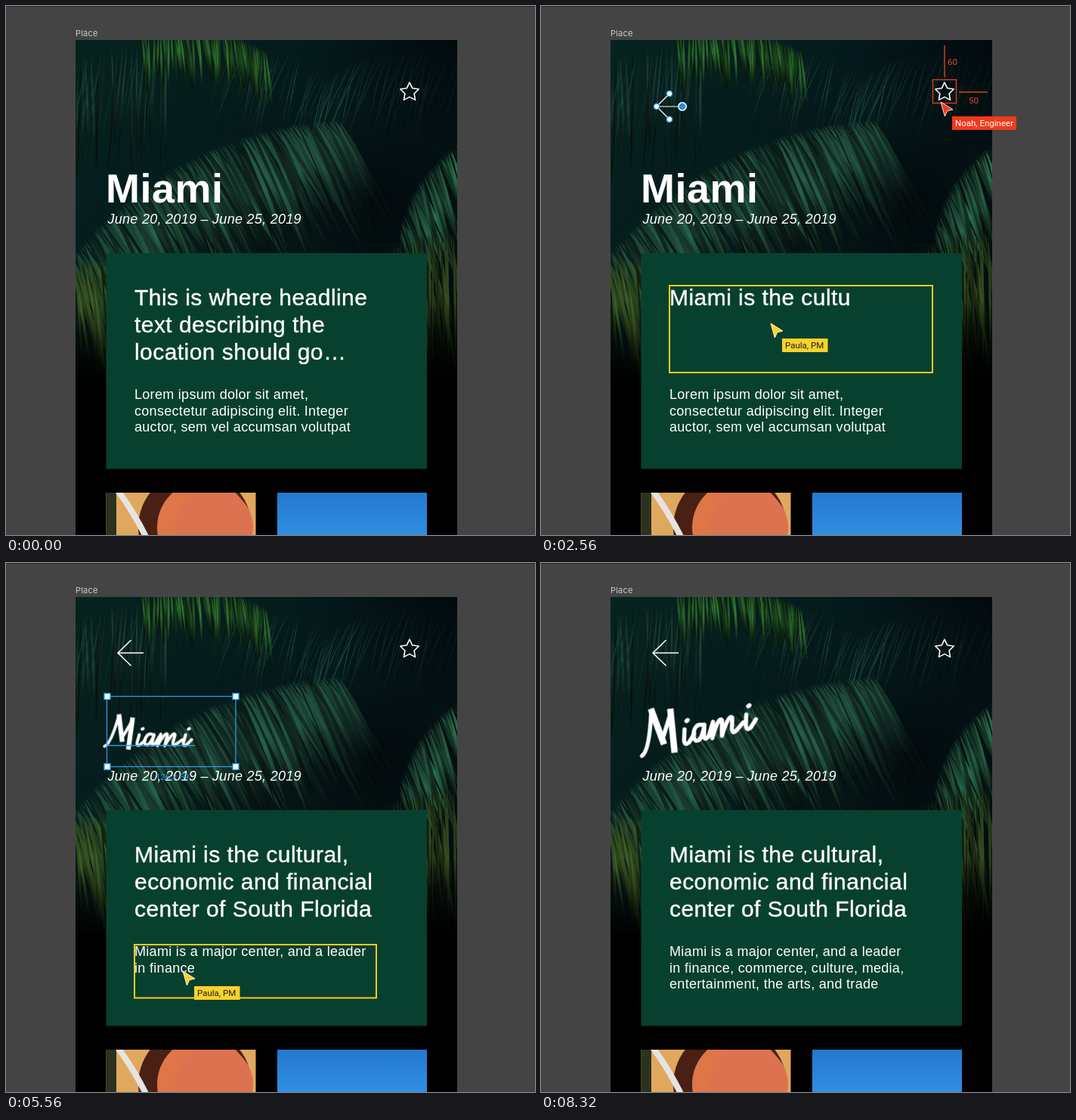
An HTML page with a canvas for the animation above (8560 ms loop, 700x700 px).

```html
<!DOCTYPE html>
<html lang="en">
<head>
<meta charset="utf-8">
<title>Place</title>
<style>
html, body { margin: 0; width: 100%; height: 100%; overflow: hidden; background: #444; }
canvas, svg { position: absolute; left: 0; top: 0; width: 700px; height: 700px; }
text { white-space: pre; fill: #fff; font-family: "Liberation Sans", Arial, sans-serif; }
.head { font-size: 30px; letter-spacing: .45px; stroke: #fff; stroke-width: .4px; }
.para { font-size: 18px; letter-spacing: .3px; }
.title { font-size: 54px; font-weight: 700; letter-spacing: .5px; }
.date { font-size: 18px; font-style: italic; letter-spacing: .28px; }
.board { font: 11px Inter, sans-serif; letter-spacing: .2px; fill: #ccc; }
.tag { font: 11.5px Roboto, sans-serif; }
.white, .blue, .red, .yellow, .brush { fill: none; }
.white { stroke: #fff; stroke-width: 1.6; stroke-linejoin: round; }
.thin { stroke-width: 1.2; }
.blue { stroke: #2f9be6; stroke-width: 1.3; }
.knob { fill: #fff; stroke: #2f9be6; stroke-width: 1.4; }
.picked { fill: #2090e0; stroke: #fff; stroke-width: 1.6; }
.red { stroke: #d8401f; stroke-width: 1.4; }
.yellow { stroke: #f5c922; stroke-width: 2; }
.brush { stroke: #fff; stroke-width: 5.4; stroke-linecap: round; stroke-linejoin: round; }
.wide { stroke-width: 8.5; stroke-linecap: butt; }
#spin { transform-origin: 212px 222px; }
#grow { transform-origin: 137px 260px; }
</style>
</head>
<body>
<canvas id="art" width="700" height="700"></canvas>
<svg viewBox="0 0 700 700">
  <defs>
    <path id="arrow" d="M0 0L16 10L8.6 11.8L5.4 19Z" stroke-linejoin="round"/>
    <path id="letterI" class="brush" d="M191 215L187 229Q186 237 193 233L202 224M196 205l2 -1"/>
  </defs>
  <text class="board" x="92" y="40">Place</text>
  <path id="star" class="white"/>

  <g id="vec"></g>
  <g id="back"><g id="backMove">
    <path class="white" d="M165.5 102L148 119L165.5 136M148 119H182"/>
    <rect id="backBox" class="blue" x="147.5" y="101.5" width="35" height="35"/>
  </g></g>

  <text id="bold" class="title" x="132" y="260">Miami</text>
  <g id="spin">
    <g id="script"><g id="grow">
      <path class="brush" d="M128 236Q139 232 153 184M159 222L178 190"/>
      <path class="brush wide" d="M154 178L160 228M179 184L171 242"/>
      <path class="brush" d="M216 215Q206 210 201 224Q199 236 207 233Q213 228 218 215L214 229Q213 237 220 231L230 214L224 235Q239 208 242 215L237 235Q253 208 256 215L252 229Q251 237 258 232L269 224"/>
      <use href="#letterI"/><use href="#letterI" x="84"/>
    </g></g>
    <rect id="spinBox" class="blue" x="114" y="166" width="196" height="110"/>
  </g>
  <text class="date" x="134.5" y="288">June 20, 2019 – June 25, 2019</text>

  <g id="pick">
    <rect class="blue" x="133.5" y="176.5" width="170.5" height="93"/>
    <path id="underBold" class="blue" d="M134 259H290"/>
    <path id="underScript" class="blue" d="M134 241.5H250"/>
    <g id="handles"></g>
    <text class="tag" x="220" y="287" text-anchor="middle" style="fill:#2f9be6">126 × 69</text>
  </g>

  <g id="headOld"></g><g id="headNew"></g>
  <g id="paraOld"></g><g id="paraNew"></g>
  <rect id="headBox" class="yellow" x="170" y="370" width="348" height="115"/>
  <rect id="paraBox" class="yellow" x="170" y="505" width="320" height="70.5"/>

  <g id="measure">
    <rect class="red" x="518.5" y="97.5" width="31" height="31"/>
    <path class="red" d="M534 52V94M553 114H591"/>
    <text class="tag" x="538" y="78" style="fill:#e0492a">60</text>
    <text class="tag" x="566" y="129" style="fill:#e0492a">50</text>
  </g>

  <g id="pen"><g id="penMove">
    <path d="M0 0Q1 12 10 17L17 10Q12 1 0 0Z" fill="#fff" stroke="#111" stroke-linejoin="round"/>
    <path d="M1 1L8 8M8.5 15.5L15.5 8.5" stroke="#111"/>
    <circle cx="8" cy="8" r="1.5"/>
    <circle cx="17.5" cy="17.5" r="2.8" fill="#333" stroke="#ddd" stroke-width="1.5"/>
  </g></g>
  <g id="hand"><use id="handMove" href="#arrow" fill="#1c1c1c" stroke="#fff" stroke-width="1.2"/></g>
  <g id="pm"><g id="pmMove">
    <use href="#arrow" fill="#fbd12b" stroke="#fff6cf"/>
    <rect x="15" y="20" width="60.5" height="18" fill="#fbd12b"/>
    <text class="tag" x="19" y="33" style="fill:#1d1d1d">Paula, PM</text>
  </g></g>
  <g id="eng"><g id="engMove">
    <use href="#arrow" fill="#ee3a1c" stroke="#ffe6df"/>
    <rect x="15" y="19" width="85" height="18" fill="#ee3a1c"/>
    <text class="tag" x="19" y="32">Noah, Engineer</text>
  </g></g>
</svg>
<script>
const LOOP = 8560, KEY_TIME = 21.67;
const $ = id => document.getElementById(id);
const rules = [], tracks = {};

function keyframes(prop, stops) {
  const name = 'k' + rules.length;
  const body = stops.map(([t, v]) => `${(t / LOOP * 100).toFixed(4)}%{${prop}:${v}}`).join('');
  rules.push(`@keyframes ${name}{${body}}`);
  return name;
}
function track(id, prop, stops, ease = 'ease-in-out') {
  stops = [[0, stops[0][1]], ...stops, [LOOP, stops.at(-1)[1]]];
  (tracks[id] ??= []).push(`${keyframes(prop, stops)} ${LOOP}ms ${ease} infinite`);
}
function show(id, from, to = LOOP) {
  track(id, 'opacity', [[0, 0], [from, 1], [to, 0]], 'step-end');
}
// Each leg is [leave, arrive, x, y].
function move(id, start, legs, ease) {
  let at = `translate(${start[0]}px,${start[1]}px)`;
  const stops = legs.flatMap(([leave, arrive, x, y]) =>
    [[leave, at], [arrive, at = `translate(${x}px,${y}px)`]]);
  track(id, 'transform', stops, ease);
}

function svg(tag, parent, attrs) {
  const el = document.createElementNS('http://www.w3.org/2000/svg', tag);
  for (const k in attrs) el.setAttribute(k, attrs[k]);
  return parent.appendChild(el);
}
const layout = { head: { top: 396, line: 35.8 }, para: { top: 520, line: 21.6 } };
function block(id, cls, copy, start) {
  const typed = start && keyframes('visibility', [[0, 'visible'], [LOOP - start + 10, 'hidden'], [LOOP, 'hidden']]);
  let at = start - LOOP;
  copy.split('\n').forEach((line, i) => {
    const text = svg('text', $(id), { class: cls, x: 170, y: layout[cls].top + i * layout[cls].line });
    if (!start) { text.textContent = line; return; }
    for (const ch of line) {
      svg('tspan', text, { style: `animation:${typed} ${LOOP}ms step-end ${at}ms infinite` }).textContent = ch;
      at += KEY_TIME;
    }
    at += KEY_TIME;
  });
}
function retype(cls, start, before, after) {
  block(cls + 'Old', cls, before);
  block(cls + 'New', cls, after, start);
  show(cls + 'Old', 0, start);
  show(cls + 'New', start);
}

// Product manager rewrites the copy
retype('head', 2180, 'This is where headline\ntext describing the\nlocation should go…',
  'Miami is the cultural,\neconomic and financial\ncenter of South Florida');
retype('para', 4530, 'Lorem ipsum dolor sit amet,\nconsectetur adipiscing elit. Integer\nauctor, sem vel accumsan volutpat',
  'Miami is a major center, and a leader\nin finance, commerce, culture, media,\nentertainment, the arts, and trade');
show('pm', 1200, 7140);
move('pmMove', [-76, 620], [[1200, 1640, 304, 420], [3680, 4060, 234, 540]]);
show('headBox', 1680, 3700);
show('paraBox', 4080, 7140);

// Engineer measures the star
show('eng', 1880, 4340);
move('engMove', [705, 190], [[1880, 2400, 529, 127], [3860, 4340, 705, 133]]);
show('measure', 2420, 3860);
$('star').setAttribute('d', 'M' + Array.from({ length: 10 }, (_, i) => {
  const r = i % 2 ? 6.4 : 12.8, a = (i / 5 - .5) * Math.PI;
  return [534 + r * Math.cos(a), 114 + r * Math.sin(a)].map(n => n.toFixed(2)).join(' ');
}).join('L') + 'Z');

// Designer draws the back icon: three spokes on one hub
const PEN_STEP = 180, hub = [153, 133];
const visits = [[170, 116], hub, [170, 150], hub, [187, 133]];
const legs = visits.map(([x, y], i) => {
  const arrive = 900 + i * PEN_STEP;
  return [i ? arrive - PEN_STEP + 40 : 200, arrive, x, y];
});
show('pen', 200, 1720);
move('penMove', [-20, 690], legs, 'ease-out');
show('vec', 900, 2800);
visits.forEach(([x, y], i) => {
  if (visits[i] === hub) return;
  const spoke = svg('path', $('vec'), { id: 'spoke' + i, class: 'white thin', d: `M${hub}L${x} ${y}` });
  show(spoke.id, legs[i || 1][1]);
});
visits.forEach(([x, y], i) => {
  if (i === 3) return;
  const last = i === 4;
  const node = svg('circle', $('vec'), { id: 'node' + i, class: last ? 'picked' : 'knob', cx: x, cy: y, r: last ? 5.2 : 3.7 });
  show(node.id, legs[i][1]);
});
show('back', 2800);
move('backMove', [5, 14], [[3000, 3360, 0, 0]]);
show('backBox', 2920, 3520);

// Designer restyles the title
show('hand', 2760, 4500);
track('handMove', 'opacity', [[0, 1], [8300, 0]], 'step-end');
tracks.hand = [`${keyframes('opacity', [[0, 0], [2760, 1], [4500, 0], [6680, 1], [8300, 0], [LOOP, 0]])} ${LOOP}ms step-end infinite`];
move('handMove', [205, 165], [[2760, 2960, 172, 135], [3000, 3360, 167, 121], [3520, 3880, 237, 250],
  [4500, 6960, 316, 168], [7000, 7360, 300, 142], [7440, 7760, 645, 202]]);
show('bold', 0, 4760);
show('script', 4760);
show('pick', 3960, 6300);
show('underBold', 0, 4760);
show('underScript', 4760, 5640);
for (const x of [134, 304]) for (const y of [176.5, 269.5])
  svg('rect', $('handles'), { class: 'knob', x: x - 4, y: y - 4, width: 8, height: 8 });
track('grow', 'transform', [[5660, 'scale(.73)'], [6120, 'scale(1)']]);
track('spin', 'transform', [[7000, 'rotate(0deg)'], [7360, 'rotate(-13.5deg)']]);
show('spinBox', 6720, 7480);

for (const id in tracks) rules.push(`#${id}{animation:${tracks[id].join(',')}}`);
document.head.appendChild(document.createElement('style')).textContent = rules.join('\n');

// Still artwork
const c = $('art').getContext('2d');
let seed = 11;
const rnd = () => (seed = seed * 16807 % 2147483647) / 2147483647;
function rect(x, y, w, h, fill) { c.fillStyle = fill; c.fillRect(x, y, w, h); }
function disc(x, y, r, fill) { c.fillStyle = fill; c.beginPath(); c.arc(x, y, r, 0, 7); c.fill(); }
function within(x, y, w, h, draw) {
  c.save();
  c.beginPath();
  c.rect(x, y, w, h);
  c.clip();
  draw();
  c.restore();
}
function blend(g, ...colors) {
  colors.forEach((col, i) => g.addColorStop(i / (colors.length - 1), col));
  return g;
}
// Blades hang from a rib that bows upwards; lean is their angle in degrees.
function frond(x0, y0, x1, y1, lean, len, hue, light) {
  const w = x1 - x0, h = y1 - y0, n = Math.hypot(w, h) / 2.6;
  for (let i = 0; i < n; i++) {
    const t = i / n, bow = .44 * t * (1 - t);
    const x = x0 + w * t + h * bow, y = y0 + h * t - w * bow;
    const a = (lean + rnd() * 16 - 8) * Math.PI / 180, reach = len * (.65 + rnd() * .4);
    const dx = Math.cos(a) * reach, dy = Math.sin(a) * reach, droop = reach * .12;
    const tone = l => `hsl(${hue},42%,${l}%)`, l = light * (.3 + rnd() * .7);
    c.fillStyle = blend(c.createLinearGradient(x, y, x + dx, y + dy), tone(l * .8), tone(l), tone(l * .3));
    c.beginPath();
    c.moveTo(x, y);
    c.quadraticCurveTo(x + dx * .5 + 3, y + dy * .5 - droop, x + dx, y + dy + droop);
    c.quadraticCurveTo(x + dx * .5 - 2, y + dy * .5, x, y);
    c.fill();
  }
}
const TEAL = 166, GREEN = 150, OLIVE = 95;
rect(0, 0, 700, 700, '#444');
rect(0, 0, 700, 1, '#292929');
rect(92, 45, 505, 655, '#000');
within(92, 45, 505, 455, () => {
  rect(92, 45, 505, 455, blend(c.createLinearGradient(92, 45, 597, 400), '#06231f', '#04181b', '#030d0f'));
  frond(80, 80, 215, 60, 95, 150, TEAL, 20);
  frond(300, 50, 450, 110, 108, 140, TEAL, 21);
  frond(180, 40, 345, 60, 84, 75, 120, 34);
  frond(420, 95, 610, 60, 110, 150, TEAL, 24);
  frond(84, 335, 440, 150, 58, 175, GREEN + 8, 28);
  frond(520, 300, 610, 175, 68, 110, GREEN, 38);
  frond(490, 330, 610, 300, 84, 190, OLIVE, 24);
  frond(80, 335, 165, 360, 78, 190, OLIVE, 30);
  const corner = (x, y, r) => rect(92, 45, 505, 455, blend(c.createRadialGradient(x, y, 10, x, y, r), '#02080ccc', '#02080c00'));
  corner(490, 260, 110);
  corner(597, 45, 180);
  rect(92, 45, 505, 455, blend(c.createLinearGradient(0, 390, 0, 500), '#0000', '#000'));
});
rect(132.5, 327, 424.5, 285.5, '#08402f');
within(132.5, 644, 198, 56, () => {
  rect(132, 644, 199, 56, '#e0a75f');
  rect(132, 644, 14, 56, '#2b3320');
  disc(250, 690, 75, '#4a2015');
  disc(262, 690, 62, '#df7647');
  disc(275, 690, 52, '#dd7250');
  c.strokeStyle = '#e4e4e2';
  c.lineWidth = 8;
  c.stroke(new Path2D('M147 640Q168 668 186 704'));
});
rect(359, 644, 198, 56, blend(c.createLinearGradient(0, 644, 0, 700), '#2479ce', '#2f8ee2'));
</script>
</body>
</html>
```
